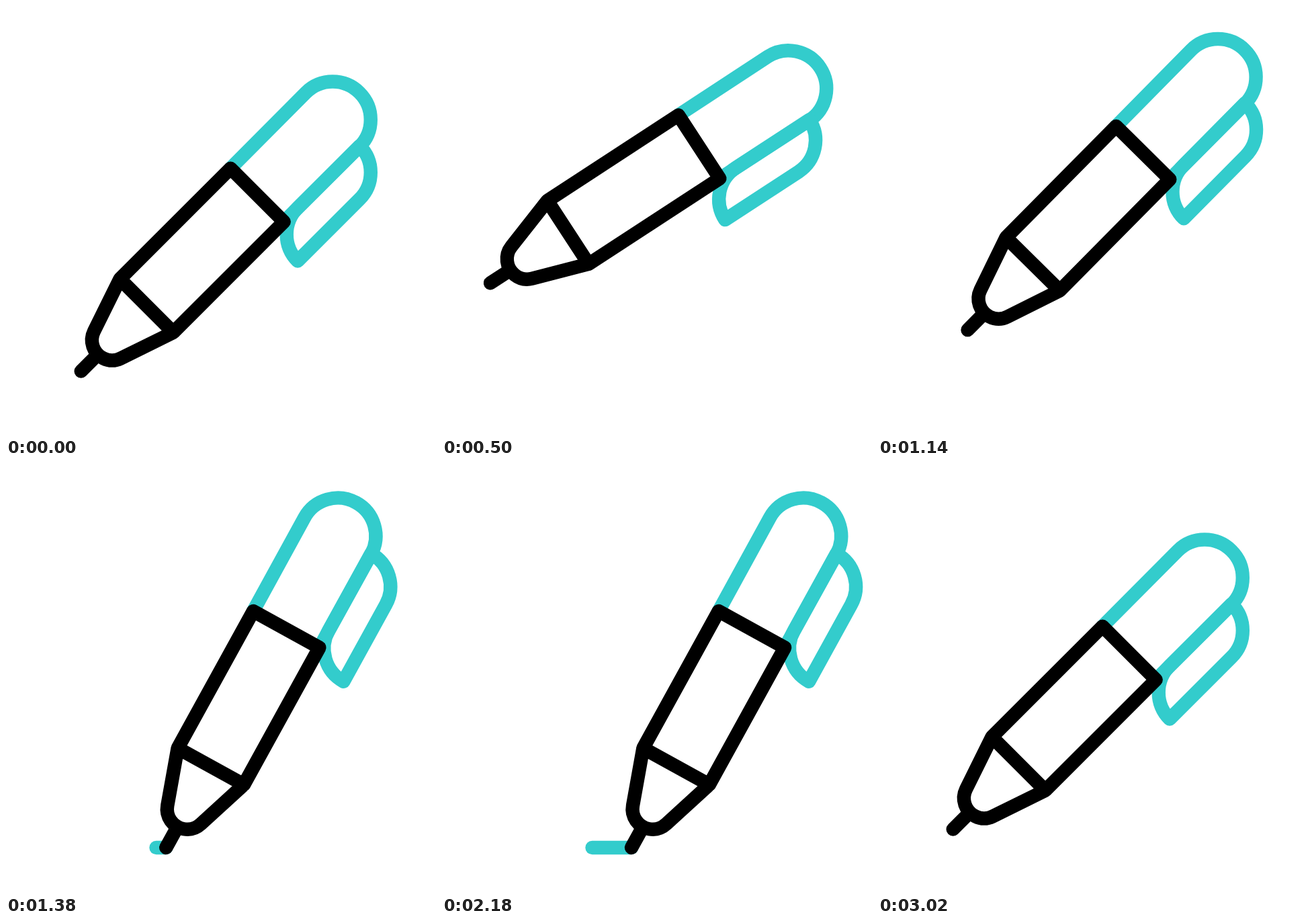
Animation of 640 by 640 pixels, one loop 3.22 s. Source, as an HTML page with a canvas:

```html
<!DOCTYPE html>
<html lang="en">
<head>
<meta charset="utf-8">
<title>Pen</title>
<style>
  html, body { margin: 0; width: 100%; height: 100%; overflow: hidden; background: #fff; }
  canvas { display: block; width: 640px; height: 640px; }
</style>
</head>
<body>
<canvas id="stage" width="640" height="640"></canvas>
<script>
const ctx = document.getElementById('stage').getContext('2d');
const LOOP = 3220, TEAL = '#33cccc', BLACK = '#000';
const PIVOT = 305.5; // distance from the tip to the turning point
const LINE = { x: 223.5, y: 571, from: 1260, until: 2500 };

const linear = x => x;
const easeOut = x => 1 - (1 - x) ** 1.5;
const easeIn = x => x ** 1.5;
const gentle = x => x - Math.sin(2 * Math.PI * x) / 20;

// Pivot position and tilt in degrees; each ease leads up to its key.
const keys = [
  { t: 0, x: 327.7, y: 327.6, tilt: 45 },
  { t: 200, x: 327.7, y: 327.6, tilt: 45, ease: linear },
  { t: 625, x: 327.9, y: 230, tilt: 30.9, ease: easeOut },
  { t: 955, x: 327.9, y: 230, tilt: 30.9, ease: linear },
  { t: 1260, x: 370.9, y: 303.4, tilt: 61.15, ease: easeIn },
  { t: 1740, x: 429.4, y: 303.4, tilt: 61.15, ease: linear },
  { t: 2485, x: 429.4, y: 303.4, tilt: 61.15, ease: linear },
  { t: 3020, x: 327.7, y: 327.6, tilt: 45, ease: gentle },
  { t: LOOP, x: 327.7, y: 327.6, tilt: 45, ease: linear }
];

function poseAt(t) {
  const i = keys.findIndex(k => k.t > t);
  const a = keys[i - 1], b = keys[i];
  const p = b.ease((t - a.t) / (b.t - a.t));
  const mix = name => a[name] + (b[name] - a[name]) * p;
  return { x: mix('x'), y: mix('y'), angle: mix('tilt') * Math.PI / 180 };
}

function stroke(color, trace) {
  ctx.strokeStyle = color;
  ctx.beginPath();
  trace();
  ctx.stroke();
}

// The pen lies along the x axis with its tip at the origin.
function drawPen() {
  const half = 56.2, shoulder = 138, collar = 370.9, capEnd = 529.6;
  const noseX = 65.4, noseR = 30, quarter = Math.PI / 2;

  stroke(TEAL, () => {
    ctx.moveTo(collar, -half);
    ctx.arc(capEnd, 0, half + 0.4, -quarter, quarter);
    ctx.lineTo(collar, half);
  });
  stroke(TEAL, () => {
    ctx.arc(400, 112, 56, 2 * quarter, 3 * quarter);
    ctx.arc(474.5, 56, 56, 0, quarter);
    ctx.closePath();
  });

  const dx = shoulder - noseX;
  const tangent = Math.atan2(half, dx) + Math.acos(noseR / Math.hypot(dx, half));
  stroke(BLACK, () => {
    ctx.rect(shoulder, -half, collar - shoulder, 2 * half);
    ctx.moveTo(shoulder, -half);
    ctx.arc(noseX, 0, noseR, -tangent, tangent, true);
    ctx.lineTo(shoulder, half);
    ctx.moveTo(0, 0);
    ctx.lineTo(noseX - noseR, 0);
  });
}

function draw(t) {
  const pose = poseAt(t);
  ctx.fillStyle = '#fff';
  ctx.fillRect(0, 0, 640, 640);
  ctx.lineWidth = 20.4;
  ctx.lineCap = ctx.lineJoin = 'round';

  if (t > LINE.from && t < LINE.until) {
    const tipX = pose.x - PIVOT * Math.cos(pose.angle);
    stroke(TEAL, () => {
      ctx.moveTo(LINE.x, LINE.y);
      ctx.lineTo(Math.max(LINE.x, tipX), LINE.y);
    });
  }

  ctx.save();
  ctx.translate(pose.x, pose.y);
  ctx.rotate(-pose.angle);
  ctx.translate(-PIVOT, 0);
  drawPen();
  ctx.restore();
}

const start = performance.now();
function tick() {
  draw((performance.now() - start) % LOOP);
  requestAnimationFrame(tick);
}
tick();
</script>
</body>
</html>
```
